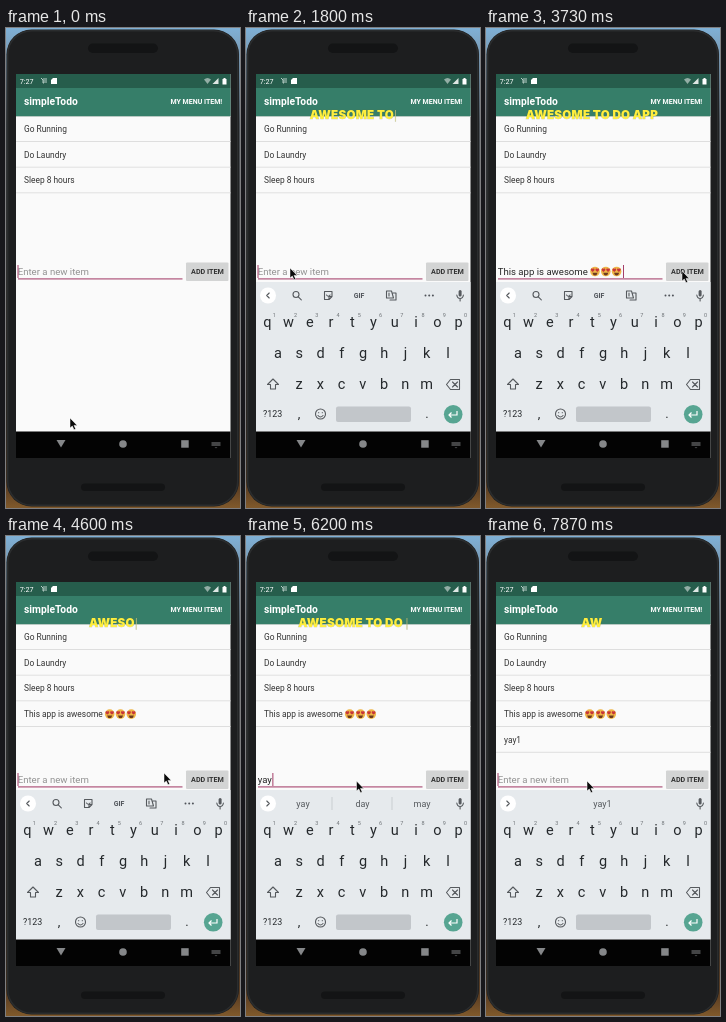
An HTML page for the animation above (8 s loop, 234 px wide and 480 px high).

```html
<!DOCTYPE html>
<html lang="en">
<head>
<meta charset="utf-8">
<title>Todo app demo</title>
<style>
  html, body { margin: 0; width: 100%; height: 100%; overflow: hidden; background: #222; }
  svg { display: block; width: 100%; height: 100%; }
  text { font-family: Roboto, sans-serif; white-space: pre; }
  #caption { font: 900 11.6px Inter, sans-serif; letter-spacing: .25px; }
  .line { fill: none; stroke: #565a5e; stroke-width: 1.1; stroke-linejoin: round; stroke-linecap: round; }
</style>
</head>
<body>
<svg viewBox="0 0 234 480" xmlns="http://www.w3.org/2000/svg">
  <defs>
    <linearGradient id="wall" x2="0" y2="1">
      <stop offset="0" stop-color="#7fb0d6"/>
      <stop offset=".05" stop-color="#7b9db8"/>
      <stop offset=".2" stop-color="#4c5258"/>
      <stop offset=".8" stop-color="#3a3028"/>
      <stop offset=".96" stop-color="#5e4024"/>
      <stop offset="1" stop-color="#80592b"/>
    </linearGradient>
    <clipPath id="screen"><rect x="10" y="46" width="214.500" height="357.500"/></clipPath>
    <g id="love">
      <circle r="4.800" fill="#eeb548"/>
      <path id="heart" d="M-2.300 .5C-5.400 -1.400 -4 -3.900 -2.300 -2.600C-.6 -3.900 .8 -1.400 -2.300 .5Z" fill="#c8363a"/>
      <use href="#heart" x="4.600"/>
      <path d="M-2.600 1.300H2.600Q2 4 0 4T-2.600 1.300Z" fill="#6d3a20"/>
    </g>
    <g id="loves"><use href="#love"/><use href="#love" x="10.800"/><use href="#love" x="21.600"/></g>
  </defs>

  <rect width="234" height="480" fill="url(#wall)"/>
  <rect x=".5" y="1.500" width="232.500" height="477" rx="25" fill="#1d1e1f"/>
  <rect x="1.700" y="2.700" width="230" height="474.500" rx="24" fill="none" stroke="#2b2d2e" stroke-width="1.500"/>
  <rect x="82" y="15.500" width="70" height="9.500" rx="4.700" fill="#131415"/>
  <rect x="75" y="455.500" width="84" height="7.500" rx="3.700" fill="#131415"/>

  <rect x="10" y="46" width="214.500" height="384" fill="#fafafa"/>
  <rect x="10" y="46" width="214.500" height="14" fill="#265d4c"/>
  <rect x="10" y="60" width="214.500" height="28" fill="#367e69"/>
  <rect x="10" y="88" width="214.500" height="1" fill="#b9c9c3"/>
  <g fill="#fff">
    <text x="13.700" y="55.500" font-size="7.200">7:27</text>
    <path d="M35 50l2 2v3h1v-5M40 50v5" fill="none" stroke="#b9cfc7"/>
    <path d="M47 50h4v6h-6v-4z"/>
    <path d="M198 51.500q3.500-3 7 0l-3.500 4.500z" opacity=".5"/>
    <path d="M206.500 56h6v-6z" opacity=".85"/>
    <path d="M216.500 51h1v-1h2v1h1v5.500h-4z"/>
    <text x="18" y="77.300" font-size="10.300" font-weight="700">simpleTodo</text>
    <text x="164.500" y="76" font-size="7" font-weight="700">MY MENU ITEM!</text>
  </g>

  <g id="list"></g>

  <text id="entry" x="11.700" y="247" font-size="9.600"></text>
  <use id="entryLoves" href="#loves" x="109" y="243.500"/>
  <rect id="caret" y="237" width="1" height="13" fill="#a53f69"/>
  <rect x="12" y="250.300" width="164.500" height="1.200" fill="#b0567d"/>
  <rect id="addBtn" x="180" y="234.500" width="42.500" height="18.500" rx="1"/>
  <text x="201.500" y="246.300" font-size="7.200" font-weight="700" text-anchor="middle" fill="#333">ADD ITEM</text>

  <g clip-path="url(#screen)">
    <g id="keyboard">
      <rect x="10" y="254" width="215" height="150" fill="#e6eaed"/>
      <circle cx="22" cy="267.500" r="8" fill="#fff"/>
      <path id="chevron" class="line"/>
      <g id="tools">
        <circle class="line" cx="50" cy="266.500" r="3"/><path class="line" d="M52.300 268.800l3 3"/>
        <path class="line" d="M78.500 263.500h7.500v5l-3 3h-4.500zM86 268.500h-3v3M80.500 267q1.800 2.500 3.600 0"/>
        <text x="113" y="270" font-size="7" font-weight="700" text-anchor="middle" fill="#50545a">GIF</text>
        <path class="line" d="M140.500 263h5l2 7h-7zM147 265h3v7h-6M143 265v3"/>
        <g fill="#50545a"><circle cx="179.500" cy="267.500" r="1"/><circle cx="183.200" cy="267.500" r="1"/><circle cx="186.900" cy="267.500" r="1"/></g>
      </g>
      <g id="words" font-size="9" text-anchor="middle" fill="#565a5e">
        <path id="bars" d="M86 261v13M146 261v13" stroke="#c9ced1"/>
      </g>
      <rect x="212.600" y="262" width="3" height="6.500" rx="1.500" fill="#565a5e"/>
      <path class="line" d="M210.800 267q.5 3.500 3.300 3.500t3.300-3.500M214.100 270.500v2.500"/>
      <g id="keys" text-anchor="middle" fill="#25292c"></g>
      <path class="line" d="M27 351l5.500 5.500h-3v4.500h-5v-4.500h-3z"/>
      <path class="line" d="M200.500 356.500l4-5h9v10h-9zM206.500 354l5 5M211.500 354l-5 5"/>
      <text x="26.700" y="389" font-size="8.900" text-anchor="middle" fill="#25292c">?123</text>
      <circle class="line" cx="74.500" cy="386" r="5"/>
      <path class="line" d="M72 387.500q2.500 3 5 0M72.700 384.500v.2M76.300 384.500v.2"/>
      <rect x="90" y="378.500" width="75" height="15.500" rx="2" fill="#c2c6ca"/>
      <circle cx="207.200" cy="386.300" r="9.300" fill="#57a592"/>
      <path d="M211 383v4h-7.500M205.500 384.500l-2.500 2.500 2.500 2.500" fill="none" stroke="#fff" stroke-width="1.200"/>
    </g>
    <g id="popup">
      <path d="M12 251.500a5.200 5.200 0 1 1-5 5.200v-5.200z" fill="#a63f5c"/>
      <rect x="17.500" y="208" width="58.500" height="27" rx="3" opacity=".1"/>
      <rect x="18" y="207" width="57.500" height="26.500" rx="2.500" fill="#fff"/>
      <text x="27" y="222.700" font-size="7.300" font-weight="700" fill="#222">Paste</text>
      <g fill="#333"><circle cx="63.500" cy="216.500" r="1.100"/><circle cx="63.500" cy="220" r="1.100"/><circle cx="63.500" cy="223.500" r="1.100"/></g>
    </g>
  </g>

  <rect x="10" y="403.500" width="214.500" height="26.500" fill="#030303"/>
  <g fill="#858789">
    <path d="M50.500 412h9l-4.500 7.500z"/>
    <circle cx="117" cy="416" r="3.800"/>
    <rect x="175.200" y="412.200" width="7.500" height="7.500"/>
    <path d="M205.500 414h9v4h-9zM208.500 419h3l-1.500 1.500z" opacity=".5"/>
  </g>

  <text id="caption" x="107.500" y="90.500" text-anchor="middle" fill="#ffee3d" stroke="#6b7030" stroke-opacity=".4" stroke-width=".6" paint-order="stroke"><tspan id="typed"></tspan><tspan id="bar" font-weight="300" font-size="9.500" fill="#e3df9a">|</tspan></text>

  <path id="mouse" d="M0 0v10l2.300-2 1.700 3.700 1.700-.8-1.700-3.500h3.200z" fill="#0a0a0a" stroke="#fff" stroke-width=".5"/>
</svg>
<script>
const LOOP = 8000;
const $ = id => document.getElementById(id);

function add(parent, tag, attrs, text) {
  const el = document.createElementNS('http://www.w3.org/2000/svg', tag);
  for (const k in attrs) el.setAttribute(k, attrs[k]);
  if (text) el.textContent = text;
  return parent.appendChild(el);
}
const show = (el, on) => el.setAttribute('visibility', on ? 'visible' : 'hidden');
const setText = (el, s) => { if (el.textContent !== s) el.textContent = s; };

// To-do rows
const PASTED = 'This app is awesome';
const rows = ['Go Running', 'Do Laundry', 'Sleep 8 hours', PASTED, 'yay1'].map((label, i) => {
  const g = add($('list'), 'g', { transform: `translate(0 ${i * 25.7})` });
  add(g, 'text', { x: 18, y: 104, 'font-size': 8.4, fill: '#333' }, label);
  add(g, 'rect', { x: 10, y: 113, width: 214.5, height: 0.9, fill: '#dcdcdc' });
  if (label === PASTED) add(g, 'use', { href: '#loves', x: 103.7, y: 101 });
  return g;
});

// Keyboard letters
[['qwertyuiop', 21.3, 299], ['asdfghjkl', 32, 329.5], ['zxcvbnm', 53, 360.5]].forEach(([chars, x0, y], row) => {
  [...chars].forEach((c, i) => {
    const x = x0 + i * 21.25;
    add($('keys'), 'text', { x, y, 'font-size': 14.5 }, c);
    if (!row) add($('keys'), 'text', { x: x + 7, y: 288.5, 'font-size': 5.5, fill: '#6d7276' }, String((i + 1) % 10));
  });
});
add($('keys'), 'text', { x: 53, y: 390, 'font-size': 13 }, ',');
add($('keys'), 'text', { x: 181, y: 390, 'font-size': 13 }, '.');
const words = [57, 116.5, 176].map(x => add($('words'), 'text', { x, y: 271 }));

// Pointer stops: time, x, y
const stops = [
  [0, 64, 390], [70, 64, 390], [430, 46, 234], [1200, 46, 234], [1600, 44, 240], [2450, 44, 240],
  [2750, 32.5, 223], [3150, 32.5, 223], [3650, 196, 243], [4150, 196, 243], [4580, 158, 237],
  [5000, 158, 237], [5450, 110.5, 245], [6700, 110.5, 245], [7030, 195, 243], [7250, 195, 243],
  [7650, 101, 245], [8000, 101, 245]
];
const ease = k => k * k * (3 - 2 * k);
function pointer(t) {
  const i = Math.max(1, stops.findIndex(s => s[0] > t));
  const [t0, x0, y0] = stops[i - 1], [t1, x1, y1] = stops[i];
  const k = ease((t - t0) / (t1 - t0));
  return [x0 + (x1 - x0) * k, y0 + (y1 - y0) * k];
}

// Field contents and suggestions by start time
const entries = [
  [0, ''], [3100, PASTED], [3870, ''], [5530, 'y', 'y', 'you', 'yes'],
  [5750, 'ya', 'ya', 'yay', 'day'], [5970, 'yay', 'yay', 'day', 'may'],
  [6500, 'yay1', '', 'yay1', ''], [7150, '', '', 'yay1', '']
];

const CAPTION = 'AWESOME TO DO APP';
function drawCaption(t) {
  const local = (t - 70 + 3667) % 3667;
  const n = t < 70 ? 0 : Math.min(CAPTION.length, Math.floor(local * 0.006));
  setText($('typed'), CAPTION.slice(0, n));
  const blink = local % 800;
  show($('bar'), n > 0 && (blink < 400 || blink > 680));
}

function draw(t) {
  const [mx, my] = pointer(t);
  $('mouse').setAttribute('transform', `translate(${mx} ${my})`);

  const slide = 1 - ease(Math.min(1, Math.max(0, (t - 430) / 200)));
  const open = slide < 1;
  $('keyboard').setAttribute('transform', `translate(0 ${slide * 150})`);
  show($('keyboard'), open);

  const [, value, ...hints] = entries.filter(e => e[0] <= t).pop();
  const suggesting = hints.length > 0;
  setText($('entry'), value || 'Enter a new item');
  $('entry').setAttribute('fill', value ? '#262626' : '#929292');
  $('caret').setAttribute('x', value === PASTED ? 137 : value ? 12.2 + $('entry').getComputedTextLength() : 11.5);
  show($('entryLoves'), value === PASTED);
  show($('popup'), t >= 2470 && t < 3100);

  show($('tools'), open && !suggesting);
  show($('words'), open && suggesting);
  show($('bars'), suggesting && hints[0] !== '');
  words.forEach((w, i) => setText(w, hints[i] || ''));
  $('chevron').setAttribute('d', suggesting ? 'M20.800 265l2.500 2.500-2.500 2.500' : 'M23.200 265l-2.500 2.500 2.500 2.500');

  const pressed = (t >= 3770 && t < 3930) || (t >= 7070 && t < 7230);
  $('addBtn').setAttribute('fill', pressed ? '#bcbdbd' : '#d3d4d4');
  show(rows[3], t >= 3870);
  show(rows[4], t >= 7150);
  drawCaption(t);
}

const start = performance.now();
function tick() {
  draw((performance.now() - start) % LOOP);
  requestAnimationFrame(tick);
}
draw(0);
requestAnimationFrame(tick);
</script>
</body>
</html>
```
